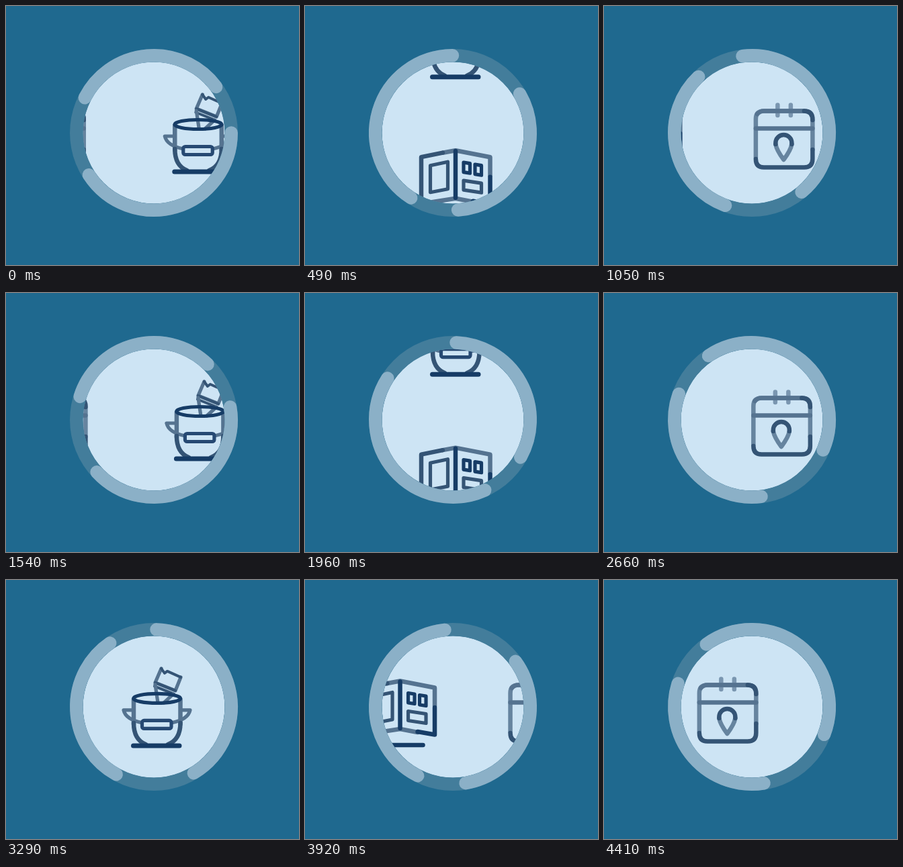
Write an HTML page that moves like this. It is 436 px wide and 386 px high and loops after 4480 ms.

```html
<!DOCTYPE html>
<html lang="en">
<head>
<meta charset="utf-8">
<title>Loader</title>
<style>
  html, body { margin: 0; width: 100%; height: 100%; overflow: hidden; background: #1f698f; }
  svg { display: block; width: 100vw; height: 100vh; }
  .icon { fill: none; stroke-linecap: round; stroke-linejoin: round; stroke-width: 6.5; }
  .deep { stroke: #163c66; }
  .dark { stroke: #345475; }
  .mid { stroke: #557390; }
  .pale { stroke: #66849f; }
  .thin { stroke-width: 5.2; }
</style>
</head>
<body>
<svg viewBox="0 0 436 386">
  <defs>
    <clipPath id="window"><circle cx="220" cy="189" r="105.7"/></clipPath>
  </defs>
  <rect width="436" height="386" fill="#1f698f"/>
  <circle cx="220" cy="189" r="105.7" fill="#cde4f4"/>
  <g clip-path="url(#window)">
    <g id="calendar" class="icon">
      <path class="pale" d="M214.500 147.500V163M234 147.500V163" opacity=".8"/>
      <path class="pale" d="M182 226V168.500Q182 156.500 194 156.500H254Q266.500 156.500 266.500 168.500V214"/>
      <path class="mid" d="M184 161Q188 156.500 194 156.500H254"/>
      <path class="dark" d="M254 156.500Q266.500 156.500 266.500 170M266.500 214V228Q266.500 240.500 254 240.500H194Q182 240.500 182 228"/>
      <path class="mid" d="M182 182.500H266.500"/>
      <path class="pale" d="M211.500 206Q213 215 223.500 229Q234 215 235.500 206"/>
      <path class="dark" d="M211.500 206V204A12 12 0 0 1 235.500 204V206"/>
    </g>
    <g id="pot" class="icon">
      <g class="thin">
        <path class="mid" d="M260 145L252 165L222 153L231 132"/>
        <path class="dark" d="M231 132L236 139L240 136L260 145" stroke-width="4"/>
        <path class="dark" d="M222 153L252 165M221 158.500L250 170" stroke-width="4"/>
        <path class="mid" d="M222 156L226 183M249 170L235 183"/>
        <path class="mid" d="M189 194H175Q178 208 203 213M260 194H274Q271 208 246 213"/>
      </g>
      <path class="mid" d="M190 178V215M259.500 178V215"/>
      <path class="dark" d="M190 213Q190 238 208 245M259.500 213Q259.500 238 241 245"/>
      <ellipse class="deep thin" cx="224.700" cy="176.500" rx="35" ry="7"/>
      <rect class="thin" x="202.500" y="209.500" width="43.500" height="12" rx="3" fill="#cde4f4" stroke="#264973"/>
      <path class="deep" d="M189.500 247H258" stroke-width="7"/>
    </g>
    <g id="building" class="icon">
      <path class="mid" d="M205 154L224 150.500L275.500 160.500V188M173 230L224 222L250 227"/>
      <path class="dark" d="M205 154L173 160.500V230"/>
      <path class="deep" d="M275.500 190V230.500L250 226"/>
      <g class="thin">
        <path class="dark" d="M186.500 173L212.500 167.500V208L186.500 213Z"/>
        <path class="deep" d="M236 168.500L245.500 170V184.500L236 183Z"/>
        <path class="deep" d="M253 171.500L262.500 173V187.500L253 186Z"/>
        <path class="dark" d="M236 195.500L262.500 199.500V213.500L236 209.500Z"/>
      </g>
      <path class="deep" d="M224 151.500V221M189.500 246H258"/>
    </g>
  </g>
  <g fill="none" stroke-width="19.5">
    <circle cx="220" cy="189" r="115.200" stroke="#437d9b"/>
    <g id="ring" stroke="#8bb0c7" stroke-linecap="round">
      <path id="shortArc"/>
      <path id="longArc"/>
    </g>
  </g>
</svg>
<script>
  const LOOP = 4480, STEP = 70, SLOT = 7.4 * STEP;
  // Distance between each icon and the one that follows it.
  const GAPS = [212, 206, 206];
  const icons = ["calendar", "pot", "building"].map(id => document.getElementById(id));
  const ring = document.getElementById("ring");

  // Slide progress within one slot: a quick swipe followed by a slow drift.
  const SWIPE = [[0, .711], [.027, .787], [.135, .804], [.351, 1],
                 [.514, 1.19], [.568, 1.402], [.784, 1.611], [1, 1.711]];
  // Ring rotation in degrees over the loop.
  const SPIN = [[0, 0], [1050, 263], [1960, 425.5], [2660, 596],
                [3290, 632], [3920, 837], [4410, 954]];

  function sample(keys, x) {
    let i = 1;
    while (i < keys.length - 1 && x > keys[i][0]) i++;
    const [x0, y0] = keys[i - 1], [x1, y1] = keys[i];
    return y0 + (y1 - y0) * (x - x0) / (x1 - x0);
  }

  function arc(from, to) {
    const point = deg => {
      const a = deg * Math.PI / 180;
      return `${220 + 115.2 * Math.sin(a)} ${189 - 115.2 * Math.cos(a)}`;
    };
    return `M${point(from)}A115.2 115.2 0 0 1 ${point(to)}`;
  }

  function place(icon, offset, vertical) {
    icon.setAttribute("visibility", "visible");
    icon.setAttribute("transform", vertical ? `translate(0 ${offset})` : `translate(${offset} 0)`);
  }

  function draw(time) {
    const t = Math.floor(time % LOOP / STEP) * STEP;
    const slot = Math.floor(t / SLOT);
    const progress = slot + sample(SWIPE, t / SLOT - slot);
    const index = Math.floor(progress), part = progress - index;
    const leaving = index % 3, entering = (index + 1) % 3;
    const vertical = leaving === 1, gap = GAPS[leaving];
    icons.forEach(icon => icon.setAttribute("visibility", "hidden"));
    place(icons[leaving], -part * gap, vertical);
    place(icons[entering], (1 - part) * gap, vertical);
    ring.setAttribute("transform", `rotate(${sample(SPIN, t)} 220 189)`);
  }

  document.getElementById("shortArc").setAttribute("d", arc(-63, 53.5));
  document.getElementById("longArc").setAttribute("d", arc(90, 237));

  const start = performance.now();
  function tick() {
    draw(performance.now() - start);
    requestAnimationFrame(tick);
  }
  tick();
</script>
</body>
</html>
```
